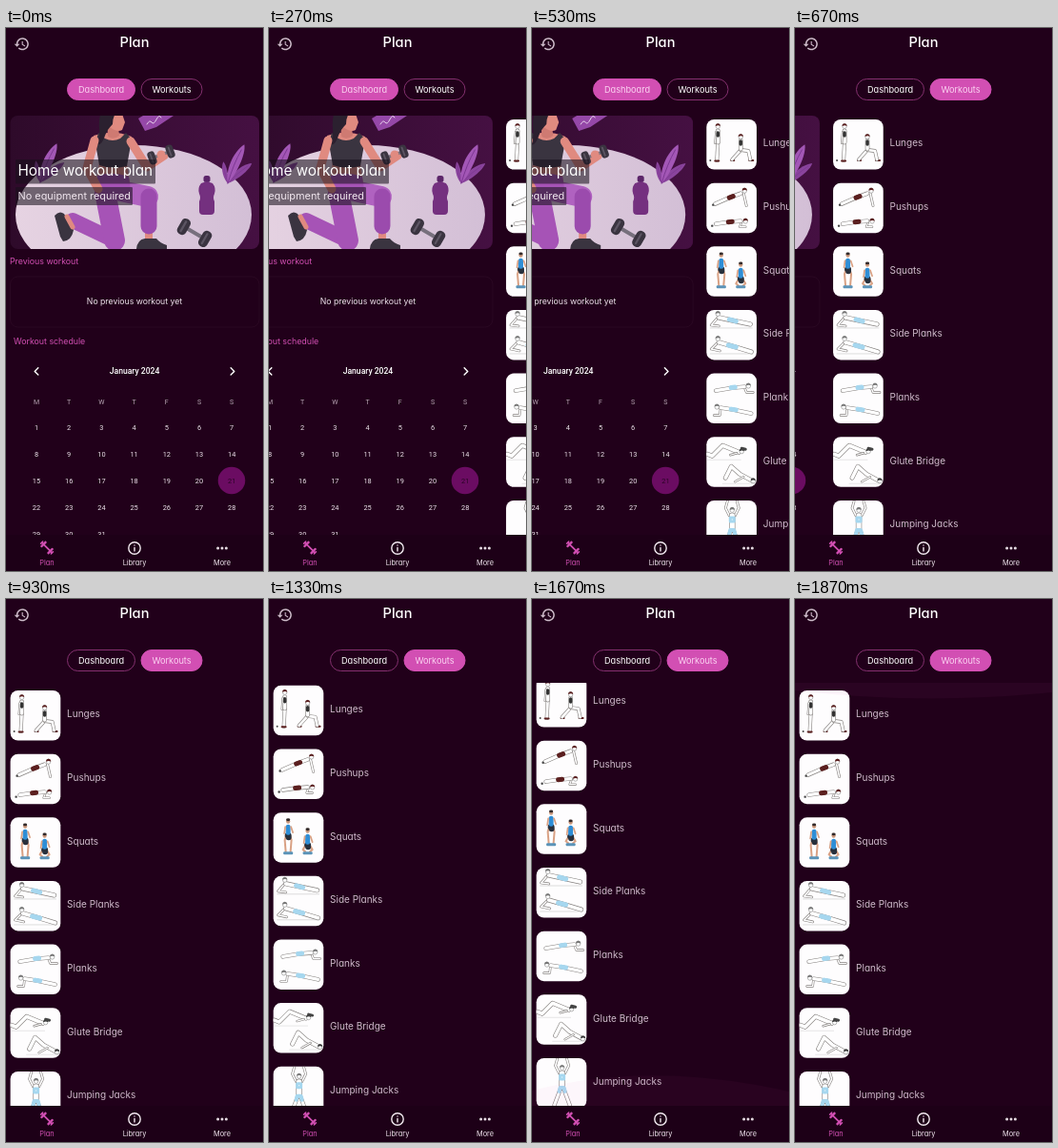
Recreate the animation shown at these times as an HTML page. Size 270 px wide and 570 px high, loop 2130 ms.

```html
<!DOCTYPE html>
<html lang="en">
<head>
<meta charset="utf-8">
<title>Workout planner</title>
<style>
html, body { margin: 0; height: 100%; overflow: hidden; background: #21001a }
svg { display: block; width: 100vw; height: 100vh }
text { font-family: Inter, "Open Sans", sans-serif; font-feature-settings: "cv11" }
.cal text { font-family: Roboto, Arial, sans-serif; text-anchor: middle }
.mid { text-anchor: middle }
.line { fill: none; stroke-linecap: round; stroke-linejoin: round }
</style>
</head>
<body>
<svg id="stage" viewBox="0 0 270 570"></svg>
<script>
const PINK = '#d24fb3', SKIN = '#e08a80', DARK = '#3a3440', PURPLE = '#a653b6';
const stage = document.getElementById('stage');

const text = (x, y, size, fill, str, attrs = '') =>
  `<text x="${x}" y="${y}" font-size="${size}" fill="${fill}" ${attrs}>${str}</text>`;
const path = (d, fill, attrs = '') => `<path d="${d}" fill="${fill}" ${attrs}/>`;
const line = (d, color, width) => `<path class="line" d="${d}" stroke="${color}" stroke-width="${width}"/>`;
const oval = (x, y, rx, ry, fill, attrs = '') =>
  `<ellipse cx="${x}" cy="${y}" rx="${rx}" ry="${ry}" fill="${fill}" ${attrs}/>`;
const rect = (x, y, w, h, r, fill, attrs = '') =>
  `<rect x="${x}" y="${y}" width="${w}" height="${h}" rx="${r}" fill="${fill}" ${attrs}/>`;

// Outlined sketch limb and head for the exercise thumbnails
const limb = (d, width = 3.6) => line(d, '#85817f', width) + line(d, '#fff', width - 1.2);
const head = (x, y, hair = '#777') =>
  oval(x, y, 2.3, 2.6, '#fff', 'stroke="#888" stroke-width=".6"') +
  path(`M${x - 2.5} ${y}a2.5 2.8 0 0 1 5 0q-2-1.5-5 0z`, hair);

const blade = (angle, size, fill) => `<g transform="rotate(${angle}) scale(${size})">` +
  path('M0 0C-6-10-6-30 3-42C8-34 5-10 0 0z', fill) + line('M0 0Q-1-20 2-36', '#7a3590', .8) + '</g>';
const plant = (x, y) => `<g transform="translate(${x} ${y})">` + blade(-16, .55, '#8a449d') +
  blade(46, .78, '#8a449d') + blade(19, 1.05, '#a357b6') + '</g>';

const dumbbell = (x, y, angle, s = 1) =>
  `<g transform="translate(${x} ${y}) rotate(${angle}) scale(${s})">` + rect(-12, -1.8, 24, 3.6, 1, '#77707d') +
  [-16, 7].map(p => rect(p, -8, 9, 16, 4, DARK) + rect(p + 3, -6, 2, 12, 1, '#5c5563')).join('') + '</g>';

function hero() {
  return `<g clip-path="url(#card)">` + rect(4, 92, 262, 140, 0, 'url(#wall)') +
    oval(134, 196, 124, 73, 'url(#floor)') + plant(36, 162) + plant(233, 163) +
    path('M139 95L146 108L158 104L176 92H144z', '#9548a8') +
    line('M148 101q3-5 5-2t5-3t5-2', '#e6cfea', 1) +
    // bottle
    rect(207.5, 155, 7, 7, 2.5, '#5c2569') +
    path('M205 163q6-3 12 0q4 5 2 11q-2 4 0 8v10q0 4-4 4h-8q-4 0-4-4v-10q2-4 0-8q-2-6 2-11z', '#74307f') +
    dumbbell(198, 215, 30, 1.12) +
    // kneeling leg
    line('M70 202L112 222', PURPLE, 16) + line('M104 172L114 223', PURPLE, 22) +
    path('M51 197q5-6 10-2l10 17q-2 11-11 12l-3-5z', DARK) + line('M64 198l6 11', SKIN, 5) +
    // front leg
    line('M150 208V222', SKIN, 8) + path('M137 232q1-10 9-11h12q4 5 11 7v4z', DARK) +
    line('M106 168L149 177', '#b062c0', 22) + line('M150 177L150 208', '#9b4bad', 17) +
    // torso
    path('M92 113Q112 106 132 114L127 142L130 164H95L98 140z', SKIN) +
    path('M97 110L104 116Q112 120 120 116L126 110L132 117L127 145Q112 149 98 144L94 121z', DARK) +
    path('M96 155Q112 150 129 156L132 176H93z', PURPLE) +
    // head in profile
    path('M106 99L107 114Q113 118 119 113L118 104z', '#cf7a72') +
    path('M106 90H122L125 99L122 107Q117 110 109 104z', SKIN) +
    path('M100 88H117Q112 92 112 101Q106 107 104 113Q100 125 95 122Q99 115 98 106Q97 96 100 88z', '#2b202f') +
    // arms
    line('M93 118L85 147L97 169', SKIN, 9) +
    line('M131 119L148 146L166 134', SKIN, 9) + dumbbell(163, 133, -20, .88) + oval(163, 133, 4.5, 4.5, SKIN) +
    rect(10, 138, 147, 25.5, 1, '#17101c', 'opacity=".57"') + rect(10, 167, 123, 19, 1, '#17101c', 'opacity=".57"') +
    '</g>' + text(12.5, 155, 15.3, '#fff', 'Home workout plan') +
    text(12.5, 179.5, 10.9, '#f0e6ee', 'No equipment required');
}

function calendar() {
  const col = i => 32 + 34.2 * i;
  let out = line('M33.8 356.8l-3.6 3.6l3.6 3.6M236.2 356.8l3.6 3.6l-3.6 3.6', '#fff', 1.4) +
    text(135, 363.2, 8.6, '#fff', 'January 2024', 'font-weight="500"') +
    oval(237, 475, 14.3, 14.3, '#6b0c62');
  [...'MTWTFSS'].forEach((d, i) => out += text(col(i), 395, 7, '#b9a7b5', d));
  for (let d = 1; d <= 31; d++)
    out += text(col((d - 1) % 7), 421.7 + 28 * Math.floor((d - 1) / 7), 7.4, d == 21 ? '#2b0526' : '#ece2ea', d);
  return `<g class="cal">${out}</g>`;
}

function dashboard() {
  return hero() + text(4, 248.3, 8.8, PINK, 'Previous workout') +
    rect(4.5, 261, 261.5, 53, 8, 'none', 'stroke="#2d0b25" stroke-width=".8"') +
    text(135, 290.2, 8.7, '#eee3eb', 'No previous workout yet', 'class="mid"') +
    text(8, 331.5, 8.8, PINK, 'Workout schedule') + calendar();
}

const BLUE = '#a6d7ef', RED = '#5b1f1f';
const exercises = [
  ['Lunges', () => limb('M12 24L11 43', 4) + limb('M12 12V24', 4.8) + limb('M10 13L9 25', 2.2) + head(12, 7, RED) +
    line('M12 14v3', '#333', 3.5) + line('M9 43.5h4M26 43h3M45 43h4', RED, 2) +
    limb('M36 32L27 42', 3.8) + limb('M36 32L44 33L46 42', 3.8) + limb('M36 22V31', 4.6) + head(36, 18, RED) +
    line('M36 23v3', '#333', 3.5) + oval(4, 43, 1, 1, '#444')],
  ['Pushups', () => limb('M39 11L42 24', 2.8) + limb('M36 11L25 15L9 22', 4.4) + line('M28 14l-4 1.5', RED, 5) +
    head(40, 8, RED) + limb('M37 41L35 46L41 46', 2.4) + limb('M36 40L24 41L10 43', 4.4) +
    line('M27 40.5l-4 .5', RED, 5) + head(41, 40, RED) + oval(7, 23, 1.2, 1.2, '#444') + oval(6, 45, 1.2, 1.2, '#444')],
  ['Squats', () => [[15.5, 10, 41, 2.5], [36, 20, 41, 4]].map(([x, y, foot, knee]) =>
    line(`M${x - 2} ${y + 14}l${-knee + 1} 5L${x - 2.5} ${foot}M${x + 2} ${y + 14}l${knee - 1} 5L${x + 2.5} ${foot}`, '#d9a184', 2) +
    line(`M${x - .5} ${y + 14}h1v2`, '#28303c', 6) + line(`M${x} ${y + 5}v6`, '#2f8ed6', 5) +
    line(`M${x - 3} ${y + 5}l-1 7M${x + 3} ${y + 5}l2 6`, '#d9a184', 1.7) +
    oval(x, y - 1, 2.1, 2.5, '#c9977c') + oval(x, y - 2.4, 2.1, 1.4, '#332a2a') +
    rect(x - 5, foot, 10, 3, 1, '#5b93b8')).join('')],
  ['Side Planks', () => limb('M12 8L5 16L13 17', 2.8) + limb('M13 8L27 11L46 15', 5) + line('M24 10l7 2', BLUE, 5) +
    head(12, 4) + limb('M12 34L5 41L14 43', 2.8) + limb('M13 34L27 38L47 44', 5) + line('M23 37l8 2', BLUE, 5) +
    head(12, 30) + line('M4 19h44M4 46h44', '#bbb', .5)],
  ['Planks', () => limb('M40 15L42 20L49 20', 2.6) + limb('M40 14L28 15L10 18', 4.4) + line('M30 14.5l-4 .5', BLUE, 5) +
    head(44, 13) + limb('M15 36L14 44L8 44', 2.6) + limb('M15 36L28 38L47 42', 4.4) + line('M26 37.5l5 .8', BLUE, 5) +
    head(11, 35)],
  ['Glute Bridge', () => limb('M34 16L17 9L6 20L1 18', 4.8) + limb('M32 17L25 19', 2.4) + head(37, 15, '#333') +
    line('M37 12l4 1', '#444', 3) + limb('M48 46L35 39L26 31L20 43', 4.8) + limb('M39 42L30 47', 2.4) +
    head(49, 46, '#333') + line('M1 24h35M17 49h34', '#ccc', .5)],
  ['Jumping Jacks', () => limb('M24 16L20 8L22 1M30 16L34 8L32 1', 2.8) + limb('M25 33L19 49M29 33L35 49', 4.2) +
    limb('M27 16V30', 6.4) + line('M25 18h4v4h-4z', BLUE, 3) + line('M25 31h4l1 4M25 31l-1 4', BLUE, 4) +
    head(27, 10)],
];

const list = () => exercises.map(([name, draw], i) =>
  `<g transform="translate(4.6 ${96 + 66.65 * i})">` + rect(0, 0, 52.7, 52.5, 8, '#fefdfe') +
  `<g clip-path="url(#thumb)">${draw()}</g>` + text(59.5, 28.4, 10, '#cfbccb', name) + '</g>').join('');

const chip = (id, x, w, label) => `<g id="${id}">` +
  rect(x, 53.5, w, 22, 11, 'none', 'stroke-width="1"') +
  text(x + w / 2, 67.8, 9.2, '#fff', label, 'class="mid"') + '</g>';

function nav() {
  const plates = side => `<g transform="scale(${side} 1)">` +
    rect(3.8, -4, 2.4, 8, .8, PINK) + rect(6.8, -2.2, 1.6, 4.4, .6, PINK) + '</g>';
  return rect(0, 532, 270, 38, 0, '#1d0017') +
    `<g transform="translate(43 545.5) rotate(45)">${rect(-8, -.9, 16, 1.8, .6, PINK)}${plates(1) + plates(-1)}</g>` +
    oval(135, 546, 6.2, 6.2, 'none', 'stroke="#f2eaf0" stroke-width="1.4"') +
    line('M135 545.5v3.6M135 542.9v.1', '#f2eaf0', 1.4) +
    [222.6, 227, 231.4].map(x => oval(x, 546, 1.5, 1.5, '#e6dbe3')).join('') +
    [[43, PINK, 'Plan'], [135, '#eee4ec', 'Library'], [227, '#eee4ec', 'More']]
      .map(([x, fill, s]) => text(x, 564, 7.4, fill, s, 'class="mid"')).join('');
}

stage.innerHTML = `<defs>
  <clipPath id="view"><rect y="88" width="270" height="444"/></clipPath>
  <clipPath id="card"><rect x="4.5" y="92" width="261.5" height="140" rx="8"/></clipPath>
  <clipPath id="thumb"><rect width="52.7" height="52.5" rx="8"/></clipPath>
  <linearGradient id="wall"><stop stop-color="#2e0a2a"/><stop offset="1" stop-color="#451042"/></linearGradient>
  <linearGradient id="floor"><stop stop-color="#e6d3e2"/><stop offset="1" stop-color="#d3bfd6"/></linearGradient>
</defs>` +
  rect(0, 0, 270, 570, 0, '#21001a') +
  path('M13 3c-4.97 0-9 4.03-9 9H1l3.9 3.9L9 12H6a7 7 0 1 1 2.06 4.94l-1.42 1.42A9 9 0 1 0 13 3zm-1 5v5l4.28 2.54.72-1.21-3.5-2.08V8z',
    '#cdbcc9', 'transform="translate(8 8.2) scale(.72)"') +
  text(135, 20.3, 14.6, '#fff', 'Plan', 'class="mid" font-weight="500"') +
  chip('tab0', 64.5, 71, 'Dashboard') + chip('tab1', 142, 64, 'Workouts') +
  `<g clip-path="url(#view)"><g id="home">${dashboard()}</g><g id="list">${list()}</g>` +
  path('M0 516Q125 484 270 517V532H0z', PINK, 'id="glowEnd"') +
  path('M0 88V96Q135 112 270 98V88z', PINK, 'id="glowTop"') + '</g>' + nav();

const LOOP = 2130, PAGE = 275.5, FRAME = 1000 / 15;
// Keyframes as [ms, value]
const swipe = [[67, 0], [133, 4], [200, 15], [267, 31], [467, 78], [533, 96], [600, 160.5],
  [667, 240], [733, 262], [800, 270.5], [867, 274], [933, PAGE]];
const scroll = [[1267, 0], [1333, 5], [1400, 18], [1467, 23.5], [1600, 23.5], [1667, 14], [1733, 3], [1800, 0]];
const glowEnd = [[1400, 0], [1467, .08], [1533, .13], [1600, .11], [1667, .04], [1733, 0]];
const glowTop = [[1733, 0], [1800, .05], [1867, .05]];

function at(keys, t) {
  const i = keys.findIndex(k => k[0] > t);
  if (i < 0) return keys[keys.length - 1][1];
  if (!i) return keys[0][1];
  const [[t0, a], [t1, b]] = [keys[i - 1], keys[i]];
  return a + (b - a) * (t - t0) / (t1 - t0);
}

const el = id => document.getElementById(id);

function setTab(id, active) {
  const [box, label] = el(id).children;
  box.setAttribute('fill', active ? PINK : '#21001a');
  box.setAttribute('stroke', active ? PINK : '#84306f');
  label.setAttribute('fill', active ? '#fbd3f1' : '#fff');
}

function draw(now) {
  const ms = Math.floor(now % LOOP / 10) * 10;
  const t = Math.floor((ms + 3.4) / FRAME) * FRAME + .5; // 15 steps per second
  const x = at(swipe, t);
  el('home').setAttribute('transform', `translate(${-x} 0)`);
  el('list').setAttribute('transform', `translate(${PAGE - x} ${-at(scroll, t)})`);
  el('glowEnd').setAttribute('opacity', at(glowEnd, t));
  el('glowTop').setAttribute('opacity', at(glowTop, t));
  setTab('tab0', x < PAGE / 2);
  setTab('tab1', x >= PAGE / 2);
}

const start = performance.now();
function tick() {
  draw(performance.now() - start);
  requestAnimationFrame(tick);
}
tick();
</script>
</body>
</html>
```
